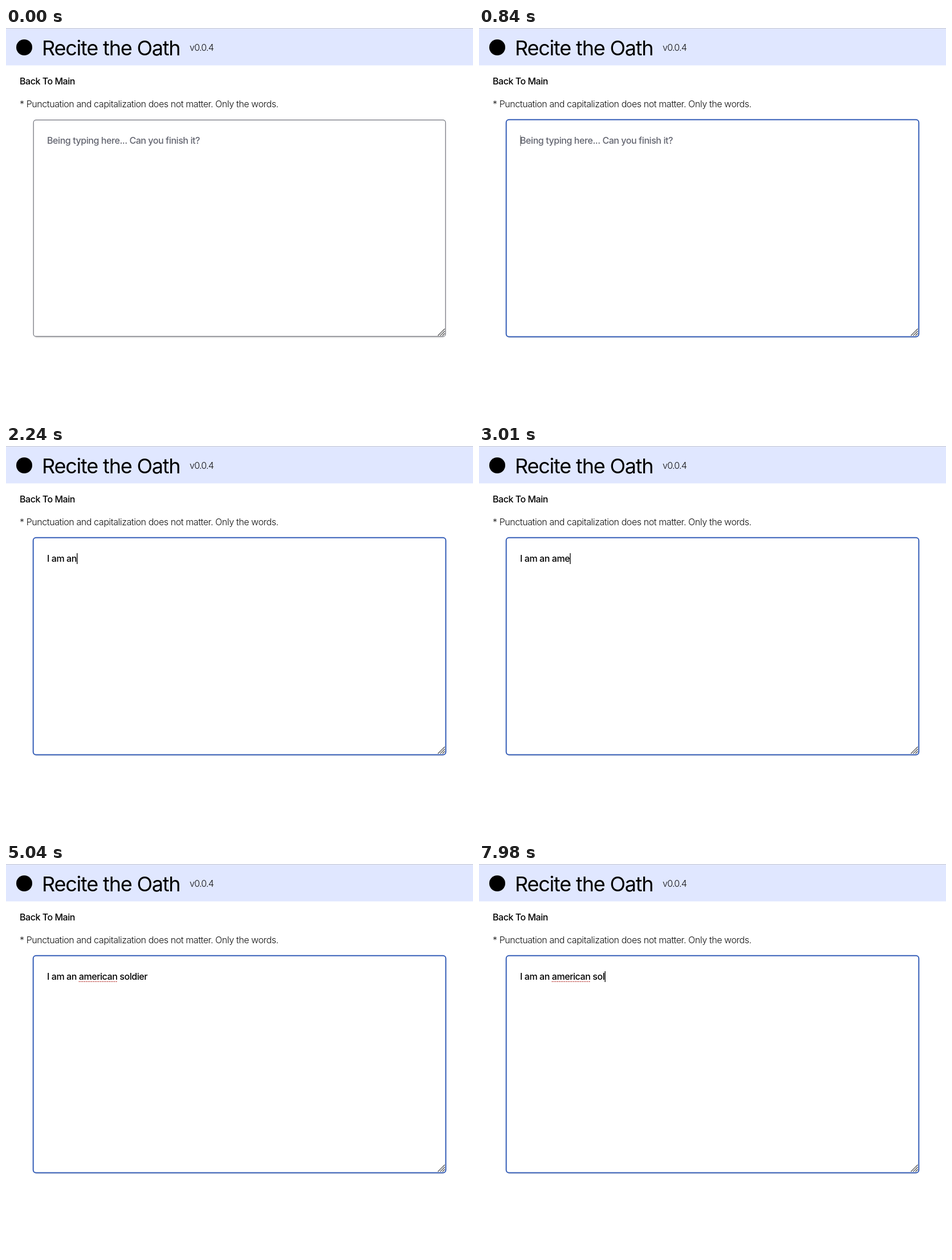
An HTML page for the animation above (8 s loop, 819 by 684 pixels).

```html
<!DOCTYPE html>
<html lang="en">
<head>
<meta charset="utf-8">
<title>Recite the Oath</title>
<style>
  html, body { margin: 0; width: 100%; height: 100%; overflow: hidden; background: #fff; }
  svg { display: block; width: 819px; height: 684px; }
  text { font: 400 16px Inter, "Open Sans", sans-serif; white-space: pre; fill: #000; }
  .title { font-size: 36px; letter-spacing: -1.2px; }
  .light { font-weight: 300; letter-spacing: -.415px; fill: #111; }
  .version { letter-spacing: -.75px; }
  .link { font-weight: 500; letter-spacing: -.47px; }
  .input { font-weight: 450; letter-spacing: -.43px; }
  .hint { fill: #62646f; }
</style>
</head>
<body>
<svg viewBox="0 0 819 684">
  <defs>
    <filter id="soft" x="-5%" y="-5%" width="110%" height="110%"><feGaussianBlur stdDeviation="1"/></filter>
  </defs>
  <rect width="819" height="684" fill="#fff"/>
  <rect width="819" height="65.5" fill="#e0e7ff"/>
  <rect width="819" height="1" fill="#c6c8d2"/>
  <circle cx="32" cy="34" r="14" fill="#000"/>
  <text class="title" x="63" y="47.5">Recite the Oath</text>
  <text class="light version" x="322" y="40">v0.0.4</text>
  <text class="link" x="24" y="99">Back To Main</text>
  <text class="light" x="24" y="139">* Punctuation and capitalization does not matter. Only the words.</text>

  <rect x="48.5" y="163" width="722" height="380" rx="5" fill="#000" opacity=".16" filter="url(#soft)"/>
  <rect id="box" fill="#fff"/>
  <path d="M757.5 539.5l12-12M761.5 539.5l8-8M765.5 539.5l4-4" stroke="#444" stroke-width="1.2" fill="none"/>
  <text id="hint" class="input hint" x="72" y="203">Being typing here... Can you finish it?</text>
  <text id="typed" class="input" x="72" y="203"></text>
  <path id="squiggle" stroke="#b8302c" stroke-width="1.6" stroke-dasharray="1.6 1.5"/>
  <rect id="caret" y="188" width="1.3" height="19" fill="#000"/>
</svg>
<script>
const LOOP = 8000, TICK = 70, LEFT = 72;
const FOCUS = 280, SPELLED = 3850;
const PHRASE = "I am an american soldier", WORD = "american";

// Bursts of keys: start, gap between keys, number of letters (negative deletes)
const BURSTS = [
  [1400, 140, 2], [1750, 112, 6], [2660, 140, 8], [3850, 70, 1], [4060, 70, 7],
  [7420, 70, -1], [7770, 105, -3]
];

// The caret rests after a key, then fades out and in by turns
const BLINK_FROM = 420, REST = 280, HALF = 700, FADE = 280;

const $ = id => document.getElementById(id);
const box = $("box"), hint = $("hint"), typed = $("typed"), squiggle = $("squiggle"), caret = $("caret");

const set = (el, attrs) => { for (const k in attrs) el.setAttribute(k, attrs[k]); };
const show = (el, on) => set(el, { visibility: on ? "visible" : "hidden" });

function typing(t) {
  let count = 0, lastKey = BLINK_FROM;
  for (const [start, gap, letters] of BURSTS) {
    if (t < start) break;
    const keys = Math.min(Math.abs(letters), Math.floor((t - start) / gap) + 1);
    count += Math.sign(letters) * keys;
    lastKey = start + (keys - 1) * gap;
  }
  return { count, lastKey };
}

function caretAlpha(t, lastKey) {
  if (t < FOCUS) return 0;
  const idle = t - lastKey - REST;
  if (idle < 0) return 1;
  const k = Math.min(1, idle % HALF / FADE);
  return Math.floor(idle / HALF) % 2 ? k : 1 - k;
}

function drawBox(focused) {
  const inset = focused ? 0 : .5;
  set(box, {
    x: 47.7 + inset, y: 160.8 + inset, width: 723.6 - 2 * inset, height: 380.6 - 2 * inset, rx: 5 - inset,
    stroke: focused ? "#375fb8" : "#70727b", "stroke-width": focused ? 2 : 1.2
  });
}

function drawSquiggle(on) {
  show(squiggle, on);
  if (!on) return;
  const from = PHRASE.indexOf(WORD);
  const x = LEFT + typed.getSubStringLength(0, from);
  set(squiggle, { d: `M${x} 206.3h${typed.getSubStringLength(from, WORD.length) - 1}` });
}

function draw(time) {
  const t = Math.floor(time / TICK) * TICK;
  const { count, lastKey } = typing(t);
  drawBox(t >= FOCUS);
  show(hint, !count);
  typed.textContent = PHRASE.slice(0, count);
  const end = count ? typed.getComputedTextLength() : 0;
  set(caret, { x: LEFT + .2 + end, opacity: caretAlpha(t, lastKey) });
  drawSquiggle(t >= SPELLED);
}

const start = performance.now();
function frame() {
  draw((performance.now() - start) % LOOP);
  requestAnimationFrame(frame);
}
frame();
</script>
</body>
</html>
```
